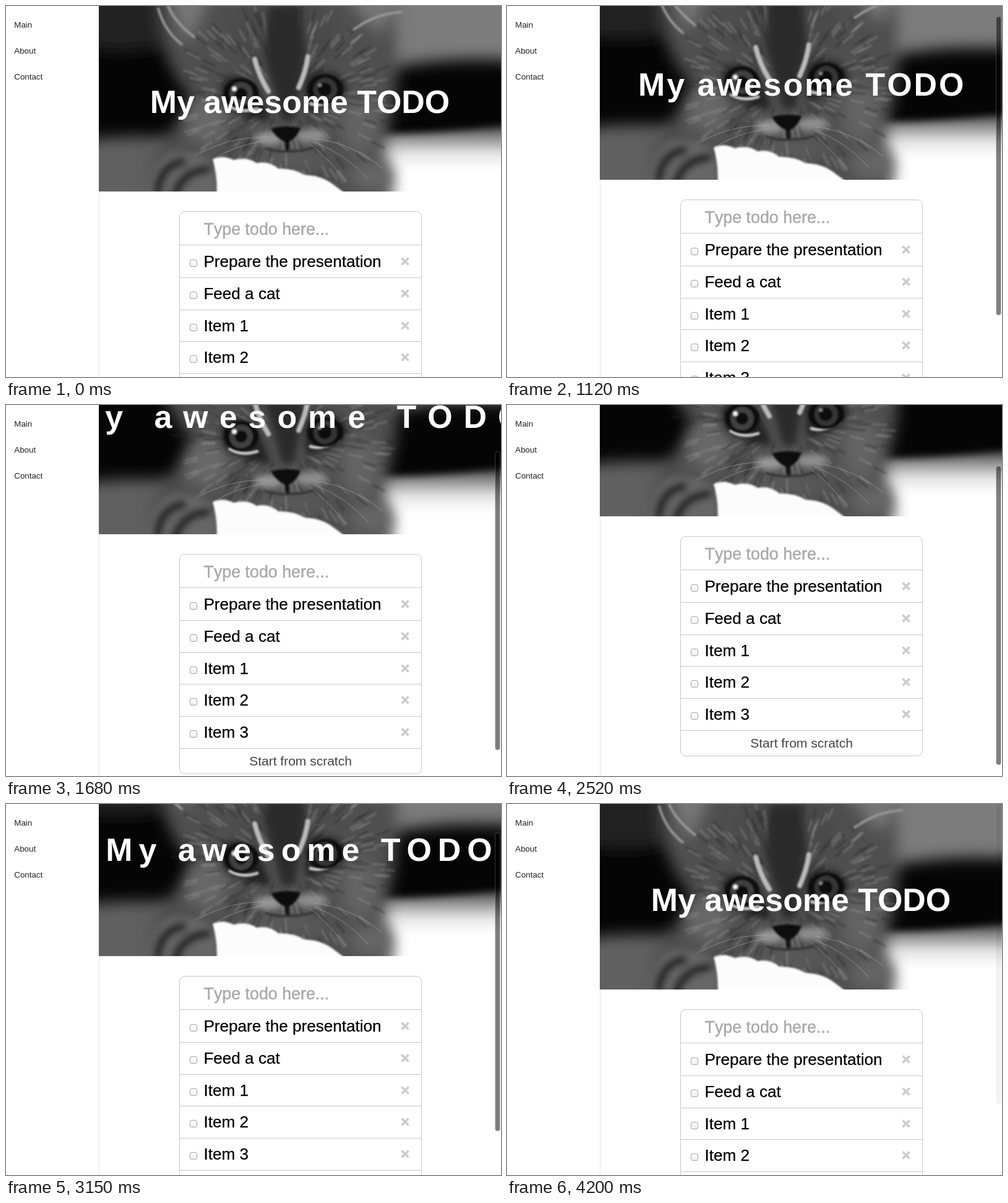
Recreate the animation shown at these times as an HTML page. Size 800 by 600 pixels, loop 4690 ms.

```html
<!DOCTYPE html>
<html lang="en">
<head>
<meta charset="utf-8">
<title>Todo page</title>
<style>
  html, body { margin: 0; width: 100%; height: 100%; overflow: hidden; background: #fff; }
  #stage { display: block; width: 800px; height: 600px; font-family: "Liberation Sans", Arial, sans-serif; }
  #title { font-size: 51.9px; font-weight: bold; fill: #fff; font-kerning: none; white-space: pre; }
  .menu { font-size: 13.33px; fill: #222; }
  .item { font-size: 26.1px; font-kerning: none; stroke: #000; stroke-width: .25; }
  .hint { font-size: 26.8px; font-kerning: none; fill: #aaa; stroke: #aaa; stroke-width: .5; }
  .line { fill: none; stroke: #c8c8c8; }
  .strokes { fill: none; stroke-linecap: round; }
</style>
</head>
<body>
<svg id="stage" viewBox="0 0 800 600">
  <defs>
    <filter id="haze" x="-30%" y="-30%" width="160%" height="160%"><feGaussianBlur stdDeviation="12"/></filter>
    <filter id="soft" x="-30%" y="-30%" width="160%" height="160%"><feGaussianBlur stdDeviation="6"/></filter>
    <filter id="fine" x="-30%" y="-30%" width="160%" height="160%"><feGaussianBlur stdDeviation="1.8"/></filter>
    <linearGradient id="floor" x2="0" y2="1">
      <stop offset="0" stop-color="#050505"/><stop offset=".12" stop-color="#777"/>
      <stop offset=".3" stop-color="#e4e4e4"/><stop offset=".45" stop-color="#fff"/>
    </linearGradient>
    <linearGradient id="box" x2="0" y2="1">
      <stop offset="0" stop-color="#fff"/><stop offset="1" stop-color="#eee"/>
    </linearGradient>
  </defs>

  <path d="M150.5 0V600" stroke="#e8e8e8"/>
  <g id="page">
    <!-- kitten photo -->
    <svg x="150" width="650" height="300" viewBox="150 0 650 300">
      <rect x="150" width="650" height="300" fill="#050505"/>
      <g filter="url(#haze)">
        <path d="M600 -60H860V92Q720 76 600 104Z" fill="#7c7c7c"/>
        <path d="M90 -60H260V65Q200 80 90 65Z" fill="#222"/>
        <path d="M90 222Q200 205 270 215L300 360H90Z" fill="#606060"/>
      </g>
      <path d="M570 206Q700 210 860 186V360H570Z" fill="url(#floor)" filter="url(#soft)"/>
      <path d="M250 -40C236 40 258 100 302 150C285 190 250 215 235 250V330H622C632 275 600 235 618 195C640 130 632 60 622 -40Z" fill="#505050" filter="url(#haze)"/>
      <g filter="url(#haze)">
        <ellipse cx="450" cy="50" rx="80" ry="70" fill="#484848"/>
        <ellipse cx="325" cy="185" rx="35" ry="40" fill="#686868"/>
        <ellipse cx="572" cy="190" rx="32" ry="50" fill="#646464"/>
        <ellipse cx="590" cy="275" rx="36" ry="24" fill="#666"/>
        <ellipse cx="450" cy="250" rx="75" ry="14" fill="#5c5c5c"/>
        <path d="M262 -20L290 62Q312 35 330 -20ZM545 -20H640Q625 30 600 45Z" fill="#777"/>
      </g>
      <g id="fur" class="strokes" stroke-width="3" stroke-opacity=".4" filter="url(#fine)"></g>
      <g filter="url(#soft)">
        <path d="M425 0L418 80L446 185H466L484 75L476 0Z" fill="#2c2c2c"/>
        <ellipse cx="425" cy="214" rx="24" ry="11" fill="#999"/>
        <ellipse cx="492" cy="210" rx="26" ry="11" fill="#909090"/>
        <path d="M348 122Q385 98 410 140L428 185Q375 185 350 155Z" fill="#202020"/>
        <path d="M484 115Q530 92 552 130Q545 165 484 172Z" fill="#202020"/>
      </g>
      <g class="strokes" filter="url(#fine)">
        <path d="M246 4Q256 40 284 62M262 0Q272 25 304 50M638 10Q598 12 562 38" stroke="#999" stroke-width="4"/>
        <path d="M402 86Q408 112 424 138M488 82Q484 108 473 132" stroke="#bbb" stroke-width="8"/>
        <path d="M362 162Q382 174 406 166M492 158Q512 164 537 148" stroke="#ccc" stroke-width="5"/>
      </g>
      <g filter="url(#fine)">
        <ellipse cx="380" cy="141" rx="28" ry="24" fill="#0c0c0c"/>
        <ellipse cx="516" cy="135" rx="29" ry="24" fill="#0c0c0c"/>
        <circle cx="380" cy="142" r="19" fill="#404040"/>
        <circle cx="516" cy="135" r="19" fill="#363636"/>
        <circle cx="380" cy="142" r="10" fill="#080808"/>
        <circle cx="515" cy="135" r="11" fill="#080808"/>
        <circle cx="369" cy="134" r="3.5" fill="#fff"/>
        <circle cx="507" cy="128" r="2.5" fill="#999"/>
        <path d="M428 198Q453 192 476 197Q470 214 457 220L458 236H453L451 220Q436 213 428 198Z" fill="#111"/>
        <path d="M457 235Q435 236 418 230M457 235Q480 235 500 228" fill="none" stroke="#333" stroke-width="3"/>
      </g>
      <path class="strokes" d="M420 212Q360 212 315 238M418 218Q370 225 335 248M498 214Q560 222 608 262M498 220Q550 240 585 280M492 224Q525 250 550 285" stroke="#bbb" stroke-opacity=".5"/>
      <g filter="url(#soft)">
        <path d="M226 330Q232 240 275 236Q325 236 340 262V330Z" fill="#666"/>
        <path class="strokes" d="M245 300Q250 258 285 252M272 310Q282 268 325 264" stroke="#1c1c1c" stroke-width="14"/>
      </g>
      <path d="M338 330Q345 285 334 248Q350 240 368 249Q390 243 405 254Q425 250 440 263Q465 262 482 273Q510 274 528 288L560 312V330Z" fill="#fcfcfc" filter="url(#fine)"/>
    </svg>
    <rect class="line" x="280.5" y="332.5" width="391" height="355" rx="8.5"/>
    <text class="hint" x="319.6" y="370">Type todo here...</text>
    <g id="rows"></g>
    <text x="476" y="674" font-size="21" fill="#444" text-anchor="middle">Start from scratch</text>
  </g>
  <text id="title">My awesome TODO</text>

  <text class="menu" x="13.3" y="35">Main</text>
  <text class="menu" x="13.3" y="77">About</text>
  <text class="menu" x="13.3" y="119">Contact</text>
  <rect id="thumb" x="790.5" width="8" height="483" rx="4" fill="#000" fill-opacity=".5" stroke="#fff" stroke-opacity=".2"/>
</svg>

<script>
  const LOOP = 4690, TICK = 70;
  const byId = id => document.getElementById(id);

  // Scroll offset on consecutive ticks; repeated values are held ticks.
  const DOWN_START = 13, UP_START = 36, BOTTOM = 121;
  const down = [1, 4, 10, 19, 30, 41, 41, 53, 66, 79, 79, 91, 106, 119, 119, 120, BOTTOM];
  const up = [120, 117, 112, 106, 106, 98, 88, 77, 66, 54, 54, 38, 21, 5, 5, 0];
  const FADE_START = 57, fade = [0.75, 0.5, 0.3, 0.1];

  const items = ["Prepare the presentation", "Feed a cat", "Item 1", "Item 2", "Item 3"];
  const rowTops = [386, 439, 491, 542, 594];
  const row = (label, i) => {
    const top = rowTops[i], base = top + (i ? 35 : 36);
    return `<path class="line" d="M281 ${top + .5}H671"/>
      <rect x="297.5" y="${base - 11.5}" width="11" height="11" rx="2.5" fill="url(#box)" stroke="#a6a6a6"/>
      <text class="item" x="319.4" y="${base}">${label}</text>
      <path d="M639.5 ${base - 14.5}l11 11m0 -11l-11 11" stroke="#ccc" stroke-width="3.6"/>`;
  };
  byId("rows").innerHTML = items.map(row).join("") + '<path class="line" d="M281 646.5H671"/>';

  let seed = 7;
  const random = () => (seed = seed * 16807 % 2147483647) / 2147483647;

  // Fur: short strokes pointing away from the nose.
  function hair() {
    const angle = random() * 2 * Math.PI, reach = 0.25 + random() * 0.75;
    const dx = Math.cos(angle), dy = Math.sin(angle);
    const x = 448 + 165 * reach * dx, y = 150 + 150 * reach * dy;
    const shade = random() < 0.5 ? "#222" : "#999";
    return `<path d="M${x} ${y}l${dx * 20} ${dy * 20}" stroke="${shade}"/>`;
  }
  byId("fur").innerHTML = Array.from({ length: 300 }, hair).join("");

  function scrollAt(tick) {
    if (tick < DOWN_START) return 0;
    if (tick < UP_START) return down[tick - DOWN_START] ?? BOTTOM;
    return up[tick - UP_START] ?? 0;
  }

  function thumbOpacity(tick) {
    if (tick <= DOWN_START) return 0;
    return tick < FADE_START ? 1 : fade[Math.min(tick - FADE_START, fade.length - 1)];
  }

  function draw(now) {
    const tick = Math.floor((now % LOOP) / TICK);
    const scroll = scrollAt(tick);
    const spacing = Math.floor(scroll / 5);
    byId("page").setAttribute("transform", `translate(0 ${-scroll})`);

    const title = byId("title");
    title.style.letterSpacing = spacing + "px";
    title.setAttribute("x", 232.7 - spacing * (6.8 + 0.035 * spacing));
    title.setAttribute("y", 172.5 - scroll - Math.floor(scroll / 2));

    const thumb = byId("thumb");
    thumb.setAttribute("y", 2 + Math.round(scroll * 0.806));
    thumb.setAttribute("opacity", thumbOpacity(tick));
  }

  const start = performance.now();
  function frame() {
    draw(performance.now() - start);
    requestAnimationFrame(frame);
  }
  frame();
</script>
</body>
</html>
```
